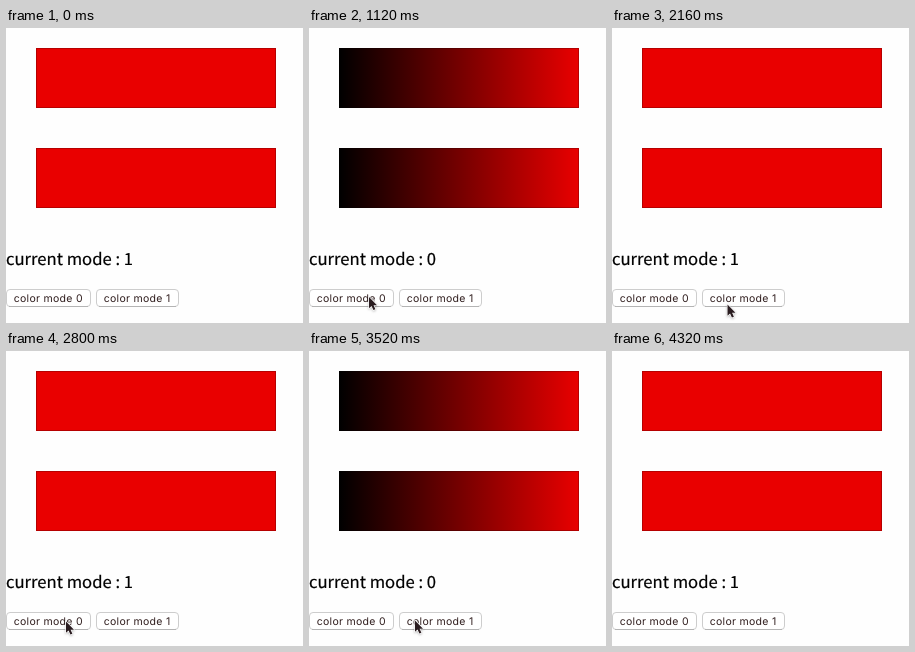
Write an HTML page that moves like this. It is 297 px wide and 295 px high and loops after 4.4 s.

```html
<!DOCTYPE html>
<html lang="en">
<head>
<meta charset="utf-8">
<title>Color modes</title>
<style>
  html, body { margin: 0; width: 100%; height: 100%; overflow: hidden; background: #fefefe; }
  svg { display: block; width: 100%; height: 100%; }
  text { text-rendering: geometricPrecision; }
  .label { font: 16.65px "Noto Sans CJK SC", "Noto Sans CJK JP", "Noto Sans", sans-serif; stroke: #000; stroke-width: .2; }
  .button text { font: 10.5px Inter, Roboto, sans-serif; letter-spacing: .3px; fill: #301e1e; }
  .button rect { fill: #fff; stroke: #cdcdcd; }
  .button path { stroke: #b4b4b4; }
  #cursor path { fill: #2a1c20; stroke: #fff; stroke-width: 1.6; stroke-linejoin: round; paint-order: stroke; filter: drop-shadow(0 1px 1px #0004); }
</style>
</head>
<body>
<svg viewBox="0 0 297 295">
  <defs>
    <linearGradient id="fade">
      <stop offset="0" stop-color="#000"/>
      <stop offset="1" stop-color="#e90000"/>
    </linearGradient>
  </defs>
  <g id="bars">
    <rect x="30" y="20" width="240" height="60"/>
    <rect x="30" y="120" width="240" height="60"/>
  </g>
  <g fill="none" stroke="#000" stroke-opacity=".22">
    <rect x="30.5" y="20.5" width="239" height="59"/>
    <rect x="30.5" y="120.5" width="239" height="59"/>
  </g>
  <text class="label" x="0" y="237" xml:space="preserve">current mode : <tspan id="mode">1</tspan></text>
  <g class="button">
    <rect x=".5" y="261.5" width="84" height="17" rx="3.5"/>
    <path d="M3 278.5H82"/>
    <text x="7.7" y="274">color mode 0</text>
  </g>
  <g class="button">
    <rect x="90.5" y="261.5" width="82" height="17" rx="3.5"/>
    <path d="M93 278.5H170"/>
    <text x="97.7" y="274">color mode 1</text>
  </g>
  <g id="cursor">
    <path transform="scale(.8)" d="M0 0V14L3.2 11.1 5.5 16.4 8 15.3 5.7 10.2H10Z"/>
  </g>
</svg>
<script>
  const LOOP = 4400, STEP = 80, CLICK_DELAY = 240;
  const $ = id => document.getElementById(id);

  // The pointer visits each stop in turn and clicks after a short rest
  const entry = { x: 84, y: 300 };
  const stops = [
    { arrive: 880, x: 60, y: 269 },
    { arrive: 1920, x: 115.5, y: 276.5 },
    { arrive: 2800, x: 60, y: 270.5 },
    { arrive: 3520, x: 106, y: 269.5 },
    { arrive: 4160, x: 112, y: 300 }
  ];

  const clamp = p => Math.max(0, Math.min(1, p));
  const ease = p => p * p * (3 - 2 * p);
  const mix = (a, b, p) => a + (b - a) * p;

  function cursorAt(t) {
    return stops.reduce((pos, stop, i) => {
      const span = 560 - 80 * i; // every trip is a little quicker
      const p = ease(clamp(1 - (stop.arrive - t) / span));
      return { x: mix(pos.x, stop.x, p), y: mix(pos.y, stop.y, p) };
    }, entry);
  }

  function draw(time) {
    const t = Math.floor((time % LOOP) / STEP) * STEP;
    const clicks = stops.filter(s => s.arrive + CLICK_DELAY <= t).length;
    const mode = (clicks + 1) % 2;
    const { x, y } = cursorAt(t);
    $("bars").setAttribute("fill", mode ? "#e90000" : "url(#fade)");
    $("mode").textContent = mode;
    $("cursor").setAttribute("transform", `translate(${x} ${y})`);
  }

  const origin = performance.now();
  function tick() {
    draw(performance.now() - origin);
    requestAnimationFrame(tick);
  }
  tick();
</script>
</body>
</html>
```
